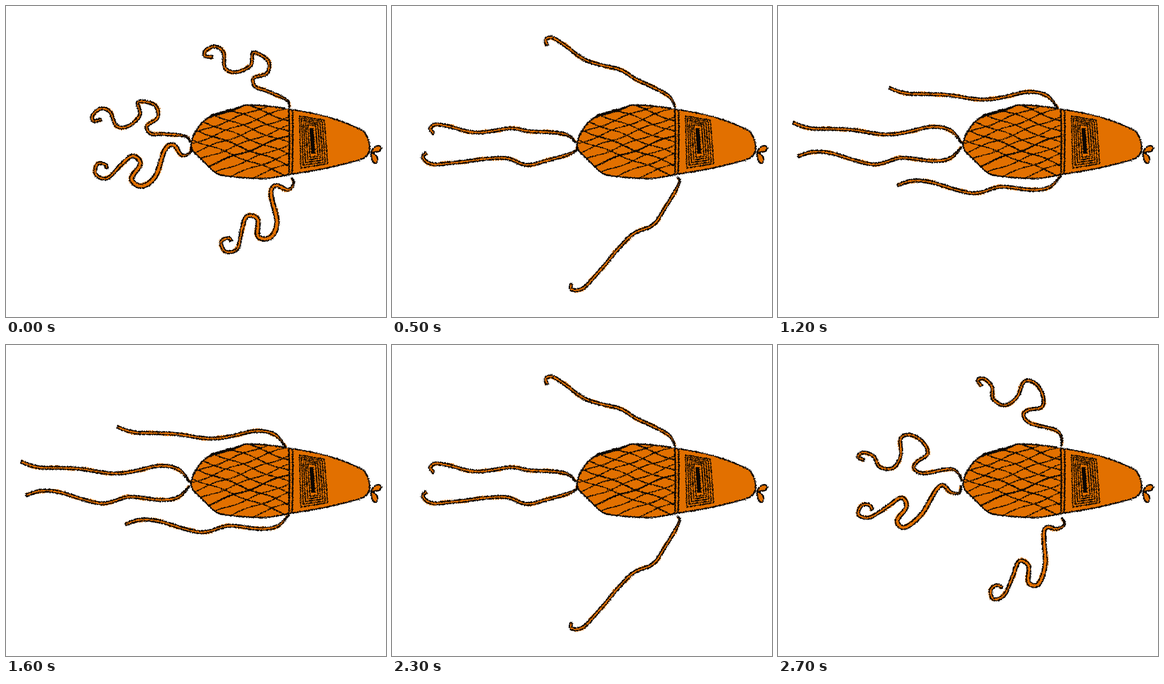
An HTML page with a canvas that plays this animation: 826 px wide and 678 px high, repeating every 2800 ms.

```html
<!DOCTYPE html>
<html>
<head>
<meta charset="utf-8">
<style>
html, body { margin: 0; width: 100%; height: 100%; overflow: hidden; background: #fff; }
canvas { display: block; filter: url(#crayon); }
svg { position: absolute; }
</style>
</head>
<body>
<svg width="0" height="0">
  <filter id="crayon" x="0" y="0" width="1" height="1" color-interpolation-filters="sRGB">
    <feTurbulence type="fractalNoise" baseFrequency=".4" numOctaves="1" seed="4"/>
    <feDisplacementMap in="SourceGraphic" scale="6" xChannelSelector="R" yChannelSelector="G"/>
  </filter>
</svg>
<canvas width="826" height="678"></canvas>
<script>
const ctx = document.querySelector('canvas').getContext('2d');
const ORANGE = '#e27000', INK = '#0c0703';
const SEGMENTS = 120, STEP = 100, HALF = 14;
const PIVOT = [401, 302];

// Key poses by step: a few points of the centre line, root to tip.
const upperPoses = [
  [0, trace('401,300 390,284 343,279 316,279 306,262 330,243 323,216 287,209 291,238 266,262 240,261 226,231 205,224 188,238 190,251 207,247')],
  [1, trace('400,300 392,280 372,270 318,280 296,270 302,255 325,237 315,212 290,196 267,203 267,240 250,268 221,266 208,243 186,234 173,243 187,251')],
  [5, trace('401,300 375,279 300,273 255,267 185,276 125,263 95,258 83,267 91,278')],
  [8, trace('401,302 375,271 330,264 245,280 150,269 75,267 33,255')]
];
const lowerPoses = [
  [0, trace('403,303 400,320 382,325 365,303 346,313 324,372 295,393 273,377 292,344 275,327 250,346 220,376 195,367 199,344 217,346 218,354')],
  [1, trace('398,303 395,322 376,321 352,307 311,370 275,398 259,383 279,353 268,333 238,352 200,376 175,370 182,350 199,349 205,360')],
  [5, trace('401,303 396,318 330,339 290,346 240,331 150,340 90,345 67,330 75,320')],
  [8, trace('401,305 375,331 335,338 270,331 205,345 120,322 75,318 44,328')]
];

// Swing of the front legs: [step, degrees].
const upperSwing = [[0, 19], [1, 25], [7, 21], [8, 16], [10, 4], [12, 0]];
const lowerSwing = [[0, -32], [7, -47], [8, -32], [10, -19], [12, 0]];

function mix(a, b, t) {
  return a + (b - a) * t;
}

// The two keys around a step, and the fraction between them.
function between(keys, step) {
  let k = 0;
  while (k < keys.length - 2 && step >= keys[k + 1][0]) k++;
  const [from, a] = keys[k], [to, b] = keys[k + 1];
  return [a, b, Math.min(1, (step - from) / (to - from))];
}

function spline(a, b, c, d, t) {
  return b + t / 2 * (c - a + t * (2 * a - 5 * b + 4 * c - d + t * (3 * (b - c) + d - a)));
}

// Turns a point string into a start, and headings and lengths of even segments.
function trace(text) {
  const pts = text.split(' ').map(p => p.split(',').map(Number));
  const at = i => pts[Math.max(0, Math.min(pts.length - 1, i))];
  const dense = [], dist = [0];
  for (let i = 0; i < pts.length - 1; i++)
    for (let j = 0; j < 20; j++)
      dense.push([0, 1].map(k => spline(at(i - 1)[k], at(i)[k], at(i + 1)[k], at(i + 2)[k], j / 20)));
  dense.push(pts[pts.length - 1]);
  for (let i = 1; i < dense.length; i++)
    dist.push(dist[i - 1] + Math.hypot(dense[i][0] - dense[i - 1][0], dense[i][1] - dense[i - 1][1]));
  const total = dist[dist.length - 1], segs = [];
  let prev = dense[0], heading = 0;
  for (let n = 1, i = 1; n <= SEGMENTS; n++) {
    const goal = total * n / SEGMENTS;
    while (i < dist.length - 1 && dist[i] < goal) i++;
    const t = (goal - dist[i - 1]) / (dist[i] - dist[i - 1]);
    const p = [0, 1].map(k => mix(dense[i - 1][k], dense[i][k], t));
    const dx = p[0] - prev[0], dy = p[1] - prev[1];
    let angle = Math.atan2(dy, dx);
    if (n > 1) angle += 2 * Math.PI * Math.round((heading - angle) / (2 * Math.PI));
    segs.push([heading = angle, Math.hypot(dx, dy)]);
    prev = p;
  }
  return { start: dense[0], segs };
}

// Centre line at a step, as [x, y, heading]; the stretched leg ripples.
function centreLine(poses, step) {
  const [a, b, t] = between(poses, step);
  const phase = Math.max(0, step - 8) * Math.PI / 2;
  let x = mix(a.start[0], b.start[0], t), y = mix(a.start[1], b.start[1], t);
  return a.segs.map((s, i) => {
    const ripple = .06 * (Math.sin(i * .13 + phase) - Math.sin(i * .13));
    const heading = mix(s[0], b.segs[i][0], t) + ripple;
    const length = mix(s[1], b.segs[i][1], t);
    x += Math.cos(heading) * length;
    y += Math.sin(heading) * length;
    return [x, y, heading];
  });
}

function ribbon(line, halfWidth, wobble) {
  const side = sign => line.map(([x, y, h], i) => {
    const s = i / SEGMENTS;
    const w = sign * halfWidth(s) + wobble * Math.sin(s * 31 + wobble);
    return [x - Math.sin(h) * w, y + Math.cos(h) * w];
  });
  const path = new Path2D();
  for (const [x, y] of [...side(1), ...side(-1).reverse()]) path.lineTo(x, y);
  path.closePath();
  return path;
}

function ink(path, width) {
  ctx.lineWidth = width;
  ctx.stroke(path);
}

function leg(line, halfWidth, root, degrees) {
  ctx.save();
  ctx.translate(...root);
  ctx.rotate(degrees * Math.PI / 180);
  ctx.translate(-PIVOT[0], -PIVOT[1]);
  ctx.fill(ribbon(line, s => halfWidth(s) + 1, 1.6));
  ink(ribbon(line, halfWidth, 0), 2.7);
  ink(ribbon(line, halfWidth, .8), 1.3);
  ctx.restore();
}

const outline = new Path2D('M402 302C406 275 425 250 448 238C470 230 500 224 520 216C550 215 590 220 614 225C660 231 700 240 735 254C755 262 772 268 780 276C788 288 791 300 791 312C789 325 778 333 765 337C740 343 710 351 690 355C665 360 640 364 617 367C590 374 560 377 548 376C520 375 480 372 465 368C450 364 430 338 415 325C408 320 403 312 402 302Z');
const bow = new Path2D('M793 320C797 308 806 303 812 305C820 310 812 318 806 318C800 318 796 320 793 320C794 330 796 342 802 343C808 343 809 334 806 328C803 323 797 321 793 320Z');
const bands = new Path2D('M615 224Q617 300 615 368M623 227Q624 300 622 365');
const bar = new Path2D('M664 266L668 322');

// A wavy net line running left from the band.
function netLine(y, slope, phase) {
  const path = new Path2D();
  for (let x = 613; x > 400; x -= 4)
    path.lineTo(x, y + (613 - x) * slope + 2 * Math.sin(x / 15 + phase));
  return path;
}

function net() {
  for (let i = 0; i < 6; i++) ink(netLine(250 + 24 * i, -.38, i), i % 4 ? 2.4 : 3);
  for (let i = 0; i < 9; i++) ink(netLine(180 + 20.5 * i, .38, i * 2), i % 5 ? 2.2 : 3.4);
}

function rings() {
  const outer = [[638, 240], [692, 249], [699, 344], [641, 353]];
  const inner = [[660, 264], [668, 264], [673, 323], [666, 324]];
  const path = new Path2D();
  for (let i = 0; i < 5; i++) {
    outer.forEach((p, c) =>
      path[c ? 'lineTo' : 'moveTo'](mix(p[0], inner[c][0], i / 5), mix(p[1], inner[c][1], i / 5)));
    path.closePath();
  }
  return path;
}

function body() {
  ctx.fill(outline);
  ctx.save();
  ctx.clip(outline);
  net();
  ctx.restore();
  ink(outline, 3.2);
  ink(bands, 3.4);
  ink(rings(), 2.3);
  ctx.lineCap = 'butt';
  ink(bar, 9);
  ctx.lineCap = 'round';
  ctx.fill(bow);
  ink(bow, 3.2);
}

function draw(step) {
  ctx.clearRect(0, 0, 826, 678);
  ctx.fillStyle = ORANGE;
  ctx.strokeStyle = INK;
  ctx.lineCap = ctx.lineJoin = 'round';
  const curl = Math.max(0, 1 - step / 5);
  const taper = s => Math.min(1, .3 + s * 7);
  const upperWidth = s => 2.9 * taper(s);
  const lowerWidth = s => (2.9 + 1.6 * curl * Math.sin(Math.PI * Math.min(1, s * 1.3))) * taper(s);
  const upper = centreLine(upperPoses, step), lower = centreLine(lowerPoses, step);
  leg(upper, upperWidth, PIVOT, 0);
  leg(lower, lowerWidth, PIVOT, 0);
  leg(upper, upperWidth, [step < 8 ? 615 : 610, 226], mix(...between(upperSwing, step)));
  leg(lower, lowerWidth, [617, step < 9 ? 371 : 365], mix(...between(lowerSwing, step)));
  body();
}

let shown = -1;
function tick() {
  const n = Math.floor(performance.now() / STEP) % (2 * HALF);
  const step = HALF - Math.abs(n - HALF);
  if (step !== shown) draw(shown = step);
  requestAnimationFrame(tick);
}
tick();
</script>
</body>
</html>
```
